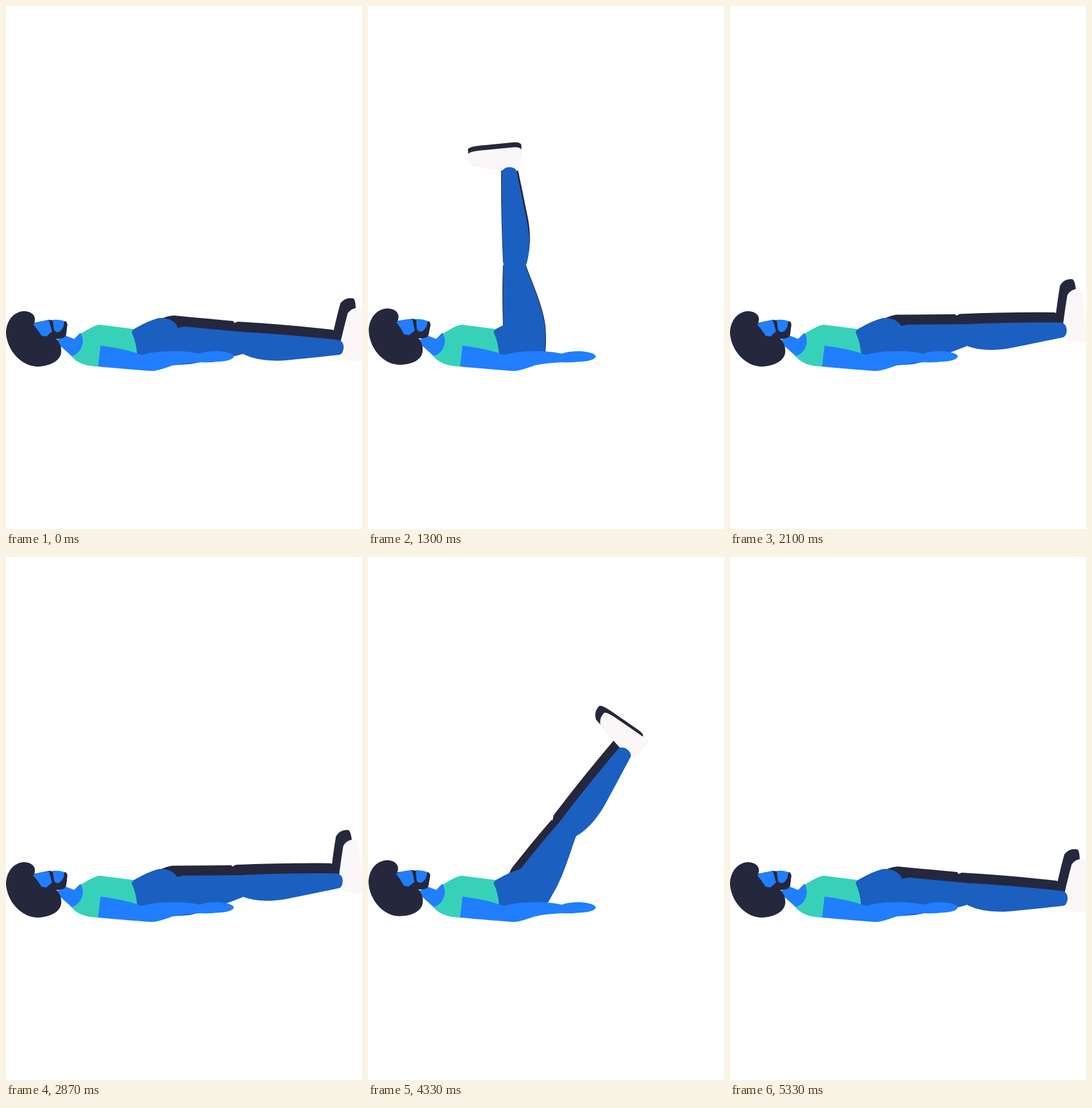
Recreate the animation shown at these times as an HTML page. Size 580x850 px, loop 5.41 s.

```html
<!DOCTYPE html>
<html lang="en">
<head>
<meta charset="utf-8">
<title>Leg raises</title>
<style>
  html, body { margin: 0; width: 100%; height: 100%; overflow: hidden; background: #fff; }
  svg { display: block; width: 580px; height: 850px; }
  .dark { fill: #25273d; }
  .skin { fill: #217eff; }
  .pants { fill: #1b5fc1; }
  .top { fill: #37d1b9; }
  .shoe { fill: #fbf6f7; }
  .far { fill: #25273d; stroke: #25273d; stroke-width: 2; }
</style>
</head>
<body>
<svg viewBox="0 0 580 850">
  <defs>
    <!-- The leg is drawn upright; script turns it about the hip -->
    <path id="shin" d="M221 424 Q217.500 350 218 270 Q221 262 230 262 Q240 262 242 268 Q251 310 260 355 Q267 395 257 423 L246 438 L228 438Z"/>
    <path id="foot" d="M163 241 Q164 236 192 234 L238 229.500 Q250 229 250 235 Q250 255 244 268 L222 268 Q190 264 173 261 Q162 254 163 241Z"/>
    <clipPath id="floor"><path d="M0 0H580V567H386L345 574L300 582L270 584L0 590Z"/></clipPath>
  </defs>

  <g id="farLeg">
    <g class="lower"><use href="#foot" class="dark"/><use href="#shin" class="far"/></g>
    <g clip-path="url(#floor)"><path class="upper far"/></g>
  </g>

  <path class="top" d="M121 533 Q145 518 153 518 L208 525 L216 568 L160 580 L150 586 Q117 585 105 567Z"/>

  <g id="nearLeg">
    <g class="lower"><use href="#foot" class="shoe"/><use href="#shin" class="pants"/></g>
    <g clip-path="url(#floor)"><path class="upper pants"/></g>
  </g>
  <path class="pants" d="M205 531 Q204 527 212 523 Q235 510 250 507 Q270 506 279 520 L288 562 L214 569 Q212 545 205 531Z"/>

  <path class="skin" d="M154 552 Q190 556 222 567 Q245 560 285 561 Q302 562 316 565 Q325 561 345 561 Q371 563 371 570 Q368 577 345 578 Q330 580 317 579 Q290 580 272 584 Q245 594 235 593 Q205 591 150 586Z"/>
  <path class="skin" d="M82 543 L98 536 L111 541 L121 531 Q126 537 125 548 Q121 565 107 569 L88 552Z"/>

  <g id="head">
    <path class="dark" d="M46 515 C51 502 39 495 28 496 C10 498 0 514 0 532 C2 560 25 586 52 586 C76 585 91 574 90 560 C90 550 86 546 82 541 Q97 541 98 534 L100 518 Q99 510 93 513 L70 510Z"/>
    <path class="skin" d="M44 517 Q56 511 70 511 L75 529 L66 537 L58 536 Q52 526 44 517Z"/>
    <path class="skin" d="M76 510 Q86 509 95 512 L94 520 Q90 529 85 530 Q79 530 78 525Z"/>
  </g>
</svg>
<script>
const LOOP = 5410, REP = 2692, RISE = 1240, FALL = 1190;
const UPRIGHT = 88, HIGH = 88.6, LOW = -4.3;
const HIP = "252.5 556", KNEE = "239 422";
const clamp = x => Math.max(0, Math.min(1, x));

// cubic-bezier(.39, 0, .26, 1), solved by bisection
function ease(x) {
  let lo = 0, hi = 1, s = .5;
  for (let i = 0; i < 24; i++) {
    const r = 1 - s;
    if (3 * r * r * s * .39 + 3 * r * s * s * .26 + s ** 3 < x) lo = s; else hi = s;
    s = (lo + hi) / 2;
  }
  return s * s * (3 - 2 * s);
}

// Leg elevation in degrees: two equal raises, each followed by a rest
function elevation(time) {
  const loop = time % LOOP, t = loop < REP ? loop : loop - REP;
  const lift = t < RISE ? ease(t / RISE) : 1 - ease(clamp((t - RISE) / FALL));
  return LOW + (HIGH - LOW) * lift;
}

const find = (id, part) => document.querySelector(`#${id} .${part}`);
const [far, near] = ["farLeg", "nearLeg"].map(id => ({ upper: find(id, "upper"), lower: find(id, "lower") }));
const head = document.getElementById("head");

function draw(time) {
  const angle = elevation(time), turn = UPRIGHT - angle;
  const u = clamp(turn / (UPRIGHT - LOW)), out = 1 - (1 - u) ** 2;
  const front = 221 - 5 * u, back = 288 - 6 * u;
  const thigh = `M${front} 518 Q219 465 221 422 L239 412 L257 423 C262 440 ${back - 4} 485 ${back} 520 Q290 540 288 564 L245 564 Q219 545 ${front} 518Z`;
  const swing = `rotate(${turn} ${HIP})`;
  const bend = `rotate(${3.6 * u} ${KNEE}) translate(0 ${-3 * out})`;

  function pose(leg, upperShift, lowerShift) {
    leg.upper.setAttribute("d", thigh);
    leg.upper.setAttribute("transform", `translate(${upperShift}) ${swing}`);
    leg.lower.setAttribute("transform", `translate(${lowerShift}) ${swing} ${bend}`);
  }
  pose(far, [-18 * out, -17 * u * u], [-12 * out, -8 - 8 * u]);
  pose(near, [0, 0], [0, 0]);
  head.setAttribute("transform", `rotate(${4 * clamp((angle - 1.7) / 66)} 95 545)`);
}

const start = performance.now();
function tick() {
  draw(performance.now() - start);
  requestAnimationFrame(tick);
}
tick();
</script>
</body>
</html>
```
